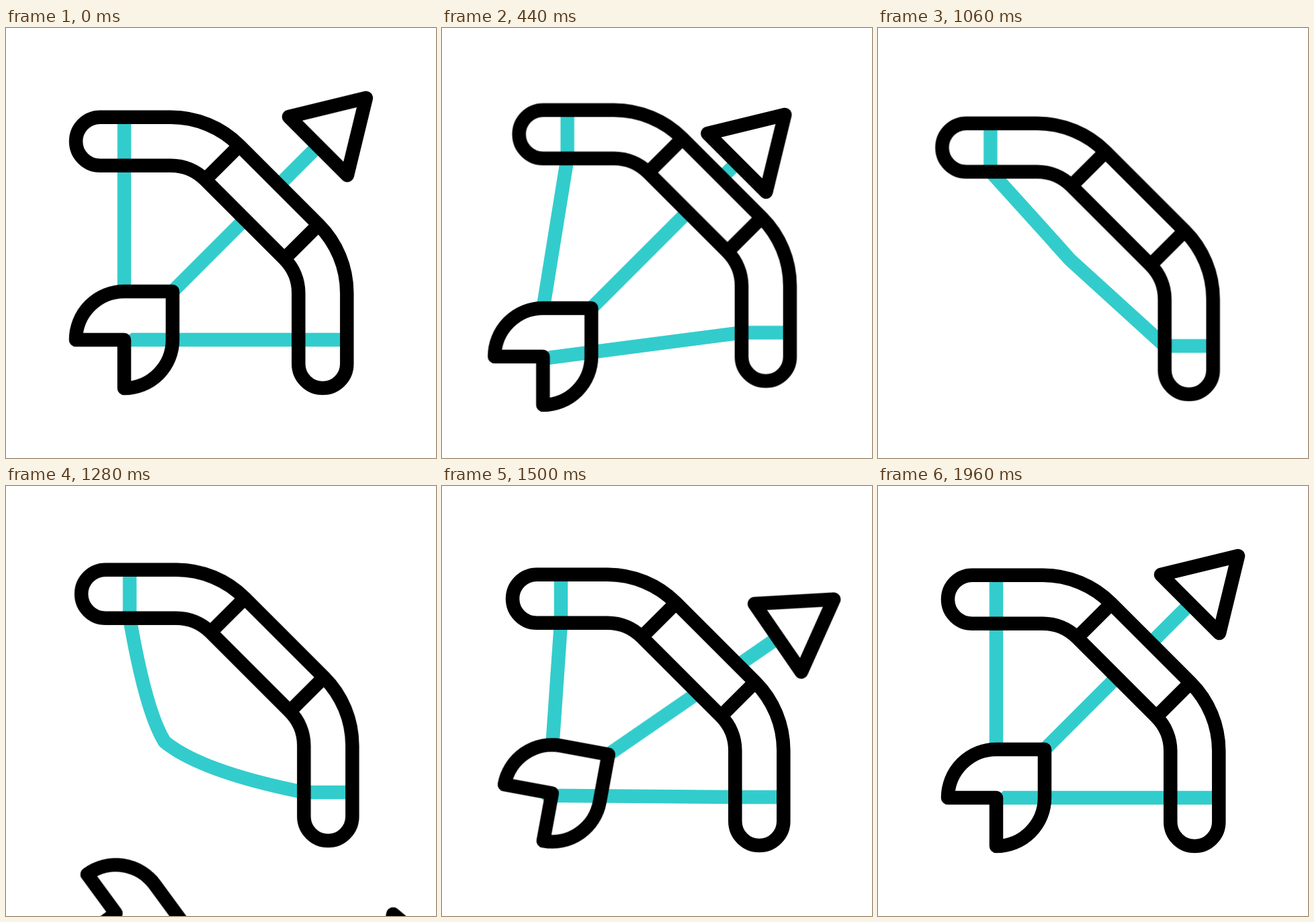
An HTML page without scripts for the animation above (2.4 s loop, 640 by 640 pixels).

```html
<!DOCTYPE html>
<html lang="en">
<head>
<meta charset="utf-8">
<title>Bow and arrow</title>
<style>
html, body { margin: 0; width: 100%; height: 100%; overflow: hidden; background: #fff; }
svg { display: block; width: 100vw; height: 100vh; }
path { fill: none; stroke-width: 20.5; stroke-linejoin: round; }
.ink { stroke: #000; }
.cord { stroke: #3cc; }
.white { fill: #fff; }
.bow, .arrow, .string { animation: 2400ms linear infinite; }
.bow { animation-name: bow; }
.arrow { animation-name: arrow; transform-origin: 320px 320px; }
.string { animation-name: string; stroke-linecap: round; }

@keyframes bow {
  0% { transform: translate(0, 0); animation-timing-function: cubic-bezier(.33, 0, .4, 1); }
  18.333%, 34.167% { transform: translate(10.6px, -10.6px); }
  35% { transform: translate(6px, -6px); }
  36.667% { transform: translate(-1px, 1px); animation-timing-function: ease-out; }
  39.167% { transform: translate(-11px, 11px); animation-timing-function: ease-in; }
  44.167% { transform: translate(-8.6px, 9.2px); animation-timing-function: ease-in-out; }
  53.333% { transform: translate(8.1px, -8.1px); animation-timing-function: ease-in-out; }
  62.5% { transform: translate(1px, -1px); animation-timing-function: ease-out; }
  67%, 100% { transform: translate(0, 0); }
}

/* pull, shoot off the top right, swing back in from below */
@keyframes arrow {
  0% { transform: translate(0, 0) rotate(0deg); animation-timing-function: cubic-bezier(.33, 0, .4, 1); }
  18.333%, 34.167% { transform: translate(-25.7px, 25px) rotate(0deg); }
  35% { transform: translate(76px, -78px) rotate(0deg); }
  40.833% { transform: translate(786px, -790px) rotate(0deg); animation-timing-function: step-end; }
  49.167% { transform: translate(70px, 600px) rotate(60deg); }
  53.333% { transform: translate(45px, 349px) rotate(54deg); }
  57.5% { transform: translate(24px, 145px) rotate(28deg); }
  62.5% { transform: translate(12px, 22.5px) rotate(10.6deg); animation-timing-function: cubic-bezier(.2, .5, .5, 1); }
  70% { transform: translate(-19px, -22px) rotate(0deg); animation-timing-function: cubic-bezier(.33, 0, .75, .9); }
  81.667%, 100% { transform: translate(0, 0) rotate(0deg); }
}

@keyframes string {
  0% {
    d: path("M176 204.5Q176 298 176 392M176 464Q306 464 435.5 464");
    animation-timing-function: cubic-bezier(.33, 0, .4, 1);
  }
  18.333%, 34.167% { d: path("M186.6 193.9Q168.5 305.5 150.5 417M150 492Q298 473 446.1 453.4"); }
  35% { d: path("M182 198.5Q217 292 252 386M252 386Q347 422 441.5 458"); }
  36.667% { d: path("M175 205.5Q243 266 310 328M310 328Q373 396 434.5 465"); }
  44.167% {
    d: path("M167.4 213.7Q227 279 286 345M286 345Q356 409 426.9 473.2");
    animation-timing-function: ease-in-out;
  }
  53.333% { d: path("M184.1 196.4Q208 335 236 380M236 380Q290 425 443.6 455.9"); }
  62.5% {
    d: path("M177 203.5Q170.5 298 164 392M158 461Q297 462 436.5 463");
    animation-timing-function: ease-out;
  }
  70% { d: path("M176 204.5Q166 288 157 371M157 443Q296 454 435.5 464"); }
  81.667%, 100% { d: path("M176 204.5Q176 298 176 392M176 464Q306 464 435.5 464"); }
}
</style>
</head>
<body>
<svg viewBox="0 0 640 640">
  <path class="cord string" d="M176 204.5Q176 298 176 392M176 464Q306 464 435.5 464"/>
  <g class="arrow">
    <path class="cord" d="M248 392L464.5 175.5"/>
    <path class="white" d="M104 464A72 72 0 0 1 176 392H248L176 464Z"/>
    <path class="ink" d="M176 464H104A72 72 0 0 1 176 392H248V464A72 72 0 0 1 176 536Z"/>
    <path class="ink" d="M421 132L536 104L508 219Z"/>
  </g>
  <g class="bow">
    <path class="white" d="M347.3 174.9L465.1 292.7L414.2 343.6L296.4 225.8Z"/>
    <path class="cord" d="M176 133V204.5M435.5 464H507"/>
    <path class="ink" d="M245.5 132.7H140a36 36 0 0 0 0 72H245.5A72 72 0 0 1 296.4 225.8L414.2 343.6A72 72 0 0 1 435.3 394.5V500a36 36 0 0 0 72 0V394.5A144 144 0 0 0 465.1 292.7L347.3 174.9A144 144 0 0 0 245.5 132.7Z"/>
    <path class="ink" d="M347.3 174.9L296.4 225.8M465.1 292.7L414.2 343.6"/>
  </g>
</svg>
</body>
</html>
```
